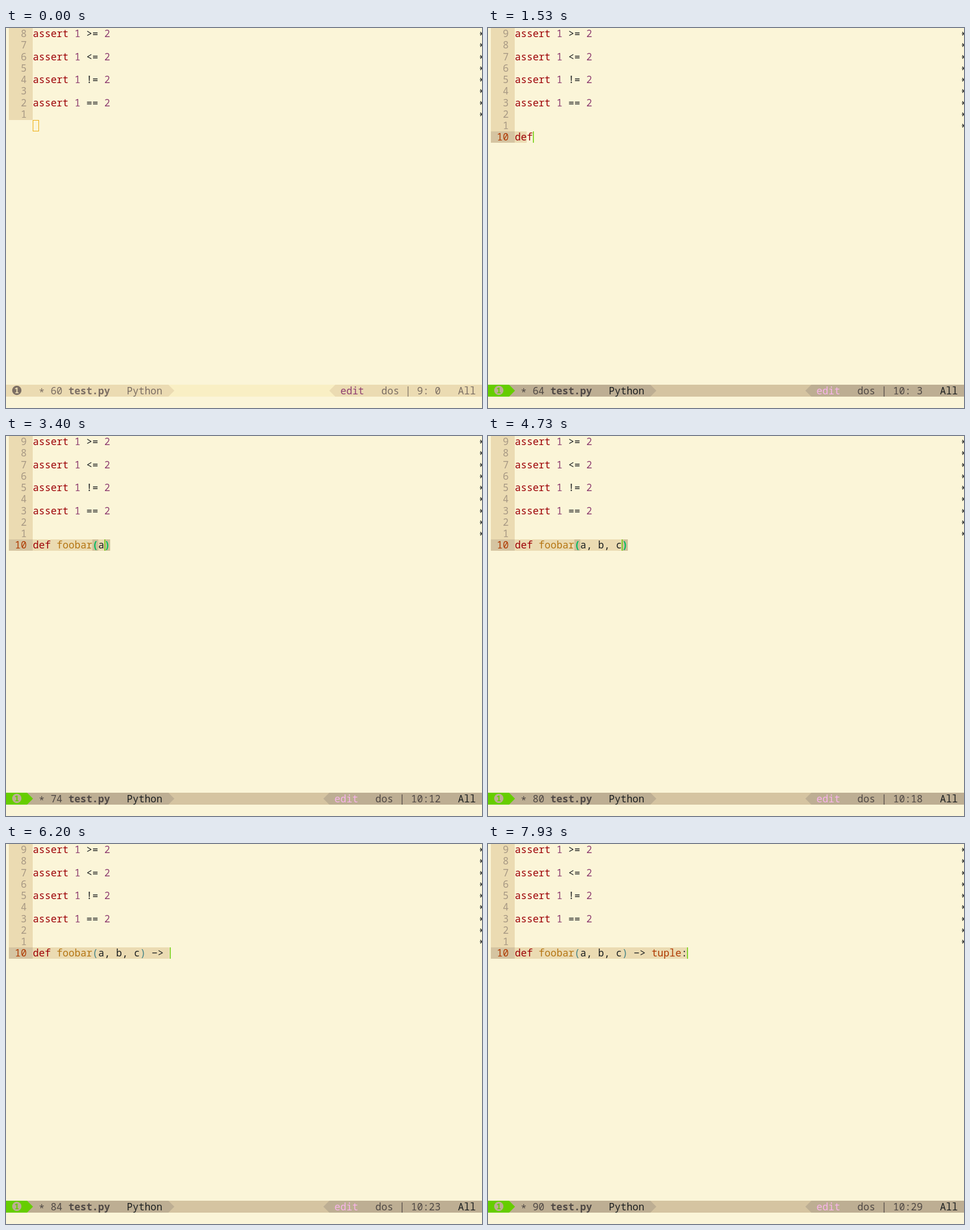
Recreate the animation shown at these times as an HTML page with a canvas. Size 837x669 px, loop 8 s.

```html
<!DOCTYPE html>
<html>
<head>
<meta charset="utf-8">
<style>
html, body { margin: 0; width: 100%; height: 100%; overflow: hidden; background: #fbf5d8; }
canvas { display: block; }
</style>
</head>
<body>
<canvas id="stage" width="837" height="669"></canvas>
<script>
const ctx = document.getElementById('stage').getContext('2d');
const LOOP = 8000, CW = 10.45, ROW = 20.25, X0 = 47.3;
const BG = '#fbf5d8', INK = '#1d2021', RED = '#9d0006', PURPLE = '#8f3f71';
const SAND = '#ebdbb2', TAN = '#d5c4a1', KHAKI = '#bdae93';
const ORANGE = '#eead0e', GREEN = '#66cd00', RUST = '#af3a03';

// time, text of line 10, caret's distance from the end of the line
const typing = [
  [1000, '', 0], [1270, 'd', 0], [1470, 'de', 0], [1530, 'def', 0], [1800, 'def ', 0],
  [2000, 'def f', 0], [2130, 'def fo', 0], [2270, 'def foo', 0],
  [2470, 'def foob', 0], [2530, 'def fooba', 0], [2670, 'def foobar', 0],
  [3070, 'def foobar()', 1], [3400, 'def foobar(a)', 1], [3600, 'def foobar(a, )', 1],
  [3930, 'def foobar(a, b)', 1], [4470, 'def foobar(a, b,)', 1],
  [4530, 'def foobar(a, b, )', 1], [4730, 'def foobar(a, b, c)', 1],
  [5470, 'def foobar(a, b, c)', 0], [5870, 'def foobar(a, b, c) ', 0],
  [6000, 'def foobar(a, b, c) − ', 0], [6200, 'def foobar(a, b, c) −> ', 0],
  [7000, 'def foobar(a, b, c) −> t', 0], [7200, 'def foobar(a, b, c) −> tu', 0],
  [7270, 'def foobar(a, b, c) −> tup', 0], [7530, 'def foobar(a, b, c) −> tupl', 0],
  [7600, 'def foobar(a, b, c) −> tuple', 0], [7930, 'def foobar(a, b, c) −> tuple:', 0]
];

function rect(x, y, w, h, color) {
  ctx.fillStyle = color;
  ctx.fillRect(x, y, w, h);
}

// Monospaced text on a fixed grid
function text(str, x, y, color, bold) {
  ctx.font = (bold ? 'bold ' : '') + '17.4px "Noto Sans Mono", "DejaVu Sans Mono", monospace';
  ctx.fillStyle = color;
  [...str].forEach((ch, i) => ctx.fillText(ch, x + i * CW, y));
}

function poly(color, ...pts) {
  ctx.fillStyle = color;
  ctx.beginPath();
  pts.forEach(([x, y]) => ctx.lineTo(x, y));
  ctx.fill();
}

const rowTop = i => Math.round(i * ROW);
const baseline = i => 16 + i * ROW;
const colX = c => X0 + c * CW;

function gutter(rows) {
  rect(5, 0, 42, rowTop(rows), SAND);
  for (let i = 0; i < rows; i++) {
    text(String(rows - i), 26, baseline(i), '#a89984');
    const y = Math.round(10 + i * ROW);
    ctx.strokeStyle = INK;
    ctx.lineWidth = 1.2;
    ctx.beginPath();
    ctx.moveTo(833, y);
    ctx.lineTo(837, y);
    ctx.moveTo(834, y - 3);
    ctx.lineTo(837, y);
    ctx.lineTo(834, y + 3);
    ctx.stroke();
  }
}

function asserts() {
  ['>=', '<=', '!=', '=='].forEach((op, i) => {
    const y = baseline(2 * i);
    text('assert', X0, y, RED);
    text('1', colX(7), y, PURPLE);
    text(op, colX(9), y, INK);
    text('2', colX(12), y, PURPLE);
  });
}

function charColor(line, i) {
  if (i < 3) return line.length > 2 ? RED : INK;
  if (i < 10) return '#b57614';
  if ('()'.includes(line[i])) return '#458588';
  return i > 22 && i < 28 && line.length > 27 ? RUST : INK;
}

function defLine(line, caret, matched, normal, lag) {
  const top = rowTop(9), y = baseline(9);
  if (line) {
    rect(5, top, 42, 20, TAN);
    text('10', 15.6, y, RUST);
    rect(47, top, (line.length - lag) * CW, 20, SAND);
  }
  [...line].forEach((ch, i) => {
    const lit = matched && '()'.includes(ch), under = normal && i === caret;
    if (lit) rect(colX(i), top, CW, 20, '#d0bf98');
    if (under) rect(colX(i), top, CW, 20, ORANGE);
    text(ch, colX(i), y, under ? BG : lit ? '#00bd62' : charColor(line, i), lit);
  });
  if (!normal) rect(Math.round(colX(caret)), top, 1.5, 20, GREEN);
}

function modeLine(active, mode, size, pos) {
  const top = 628, mid = 638.5, end = 649, y = 644.5;
  const side = active ? KHAKI : SAND;
  const soft = active ? '#504945' : '#7c6f64', hard = active ? INK : soft;
  const dosX = 764.5 - (6 + pos.length) * CW, tip = dosX - 91.5;
  rect(0, top, 837, 21, active ? TAN : '#f9efc4');
  poly(side, [0, top], [285.5, top], [296, mid], [285.5, end], [0, end]);
  poly(side, [837, top], [tip + 10.5, top], [tip, mid], [tip + 10.5, end], [837, end]);
  if (active) poly(mode, [0, top], [37, top], [47.5, mid], [37, end], [0, end]);
  ctx.fillStyle = active ? KHAKI : soft;
  ctx.beginPath();
  ctx.arc(19, 638, 8.2, 0, 7);
  ctx.fill();
  ctx.font = 'bold 14px "Noto Sans Mono", monospace';
  ctx.fillStyle = active ? mode : SAND;
  ctx.fillText('1', 14.8, 643);

  text('*', 57.5, y + 3, soft);
  text(String(size), 78.4, y, soft);
  text('test.py', 109.8, y, soft, true);
  text('Python', 212.3, y, hard);
  text('edit', dosX - 72, y, active ? '#f9b4ea' : PURPLE);
  text('dos | ' + pos, dosX, y, soft);
  text('All', 794.8, y, hard);
}

function draw(t) {
  rect(0, 0, 837, 669, BG);
  const step = typing.filter(s => s[0] <= t).pop();
  gutter(step ? 9 : 8);
  asserts();
  if (!step) {
    const active = t >= 70;
    if (active) rect(47, 162, 10.5, 20, ORANGE);
    else {
      ctx.strokeStyle = ORANGE;
      ctx.lineWidth = 1;
      ctx.strokeRect(47.5, 162.5, 10, 19);
    }
    modeLine(active, ORANGE, 60, '9: 0');
    return;
  }
  const [, line, back] = step;
  const caret = line.length - back;
  const normal = t >= 5330 && t < 5470;
  const lag = line && t < 1800 ? 1 : 0;
  defLine(line, caret, t >= 3270 && t < 5670, normal, lag);
  modeLine(true, normal ? ORANGE : GREEN, 61 + line.length, '10:' + String(caret).padStart(2));
  if (normal) text('Switched to Normal state for the next command ...', 5, 665, INK);
  if (t < 1270) text('-- INSERT --', 5, 665, INK);
}

const start = performance.now();
function tick() {
  draw((performance.now() - start) % LOOP);
  requestAnimationFrame(tick);
}
tick();
</script>
</body>
</html>
```
